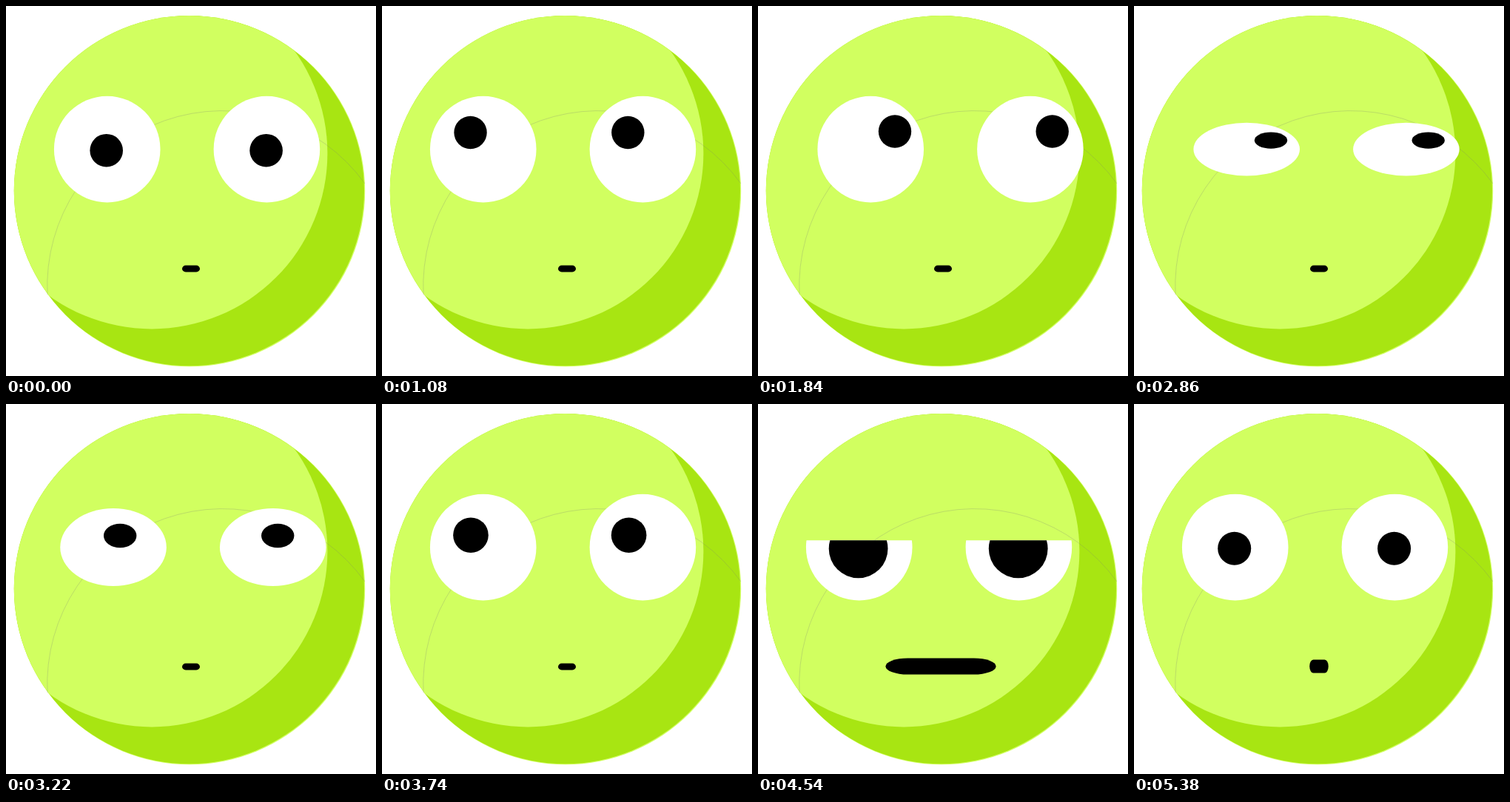
An HTML page for the animation above (5.4 s loop, 500 by 500 pixels).

```html
<!DOCTYPE html>
<html lang="en">
<head>
<meta charset="utf-8">
<title>Green face</title>
<style>
  html, body { margin: 0; width: 100%; height: 100%; overflow: hidden; background: #fff; }
  svg { display: block; width: 100%; height: 100%; }
</style>
</head>
<body>
<svg viewBox="0 0 500 500">
  <defs>
    <clipPath id="face"><circle cx="247.4" cy="249.6" r="236.6"/></clipPath>
    <clipPath id="lid"><rect id="lidBox" x="0" width="500" height="400"/></clipPath>
  </defs>
  <circle cx="248.2" cy="250.2" r="237" fill="#d1ff60"/>
  <g clip-path="url(#face)">
    <rect width="500" height="500" fill="#a8e512"/>
    <circle cx="197" cy="199" r="237.4" fill="#d1ff60"/>
  </g>
  <path d="M56 390A237 237 0 0 1 485 240" fill="none" stroke="#777" stroke-width=".5" opacity=".5"/>
  <g clip-path="url(#lid)">
    <g id="eyes">
      <circle id="white0" cy="193.6" r="71.8" fill="#fff"/>
      <circle id="white1" cy="193.6" r="71.8" fill="#fff"/>
      <circle id="pupil0"/>
      <circle id="pupil1"/>
    </g>
  </g>
  <rect id="mouth"/>
</svg>
<script>
const LOOP = 5400, EYE_Y = 193.6;
const WHITE_X = [136.7, 352.4], SHIFT = 15.5;

// Pupil poses: left x, right x, y, radius
const AHEAD = [135.7, 351.6, 195.2, 22.3];
const LEFT = [119.4, 332.2, 171, 22.2];
const RIGHT = [185, 397.7, 169.5, 22.2];
const LEFT_LOW = [118.4, 331.8, 175.4, 22.2];
const WIDE = [135.6, 351.7, 195.4, 40];

// Mouth poses: centre x, centre y, width, height
const SMALL = [250, 355, 24, 8.8];
const ROUND = [250, 354.5, 24, 18];
const FLAT = [247, 354.5, 150, 22];

const $ = id => document.getElementById(id);
const set = (id, attrs) => {
  const el = $(id);
  for (const key in attrs) el.setAttribute(key, attrs[key]);
};
const span = (t, a, b) => Math.min(1, Math.max(0, (t - a) / (b - a)));
const smooth = u => u * u * (3 - 2 * u);
const soft = u => (u + smooth(u)) / 2;
const mix = (a, b, p) => a.map((v, i) => v + (b[i] - v) * p);

function pupilPose(t) {
  if (t < 1060) return mix(AHEAD, LEFT, smooth(span(t, 0, 480)));
  if (t < 2860) return mix(LEFT, RIGHT, smooth(span(t, 1060, 1840)));
  if (t < 3620) return mix(RIGHT, LEFT_LOW, smooth(span(t, 2860, 3620)));
  if (t < 4530) return mix(LEFT_LOW, WIDE, soft(span(t, 3620, 4530)));
  return mix(WIDE, AHEAD, soft(span(t, 4530, LOOP)));
}

function mouthPose(t) {
  if (t < 3750) return SMALL;
  if (t < 4530) return mix(ROUND, FLAT, smooth(span(t, 3750, 4530)));
  return mix(FLAT, ROUND, soft(span(t, 4530, LOOP)));
}

// The lid falls fast, settles, then lifts with growing speed
function lidY(t) {
  const u = (t - 4550) / (t < 4550 ? 776 : 830);
  return 184.3 - 63 * Math.min(1, u * u);
}

function draw(t) {
  const back = smooth(span(t, 2860, 3620));
  const shift = SHIFT * (smooth(span(t, 1060, 1840)) - back);
  const squash = t < 2860 ? 1 : 0.5 + 0.5 * back;
  const pupil = pupilPose(t);
  for (const i of [0, 1]) {
    set("white" + i, { cx: WHITE_X[i] + shift });
    set("pupil" + i, { cx: pupil[i], cy: pupil[2], r: pupil[3] });
  }
  set("eyes", { transform: `translate(0 ${EYE_Y * (1 - squash)}) scale(1 ${squash})` });
  set("lidBox", { y: lidY(t) });

  const [x, y, w, h] = mouthPose(t);
  set("mouth", { x: x - w / 2, y: y - h / 2, width: w, height: h, rx: w * 0.2, ry: h / 2 });
}

const start = performance.now();
function tick() {
  draw((performance.now() - start) % LOOP);
  requestAnimationFrame(tick);
}
tick();
</script>
</body>
</html>
```
